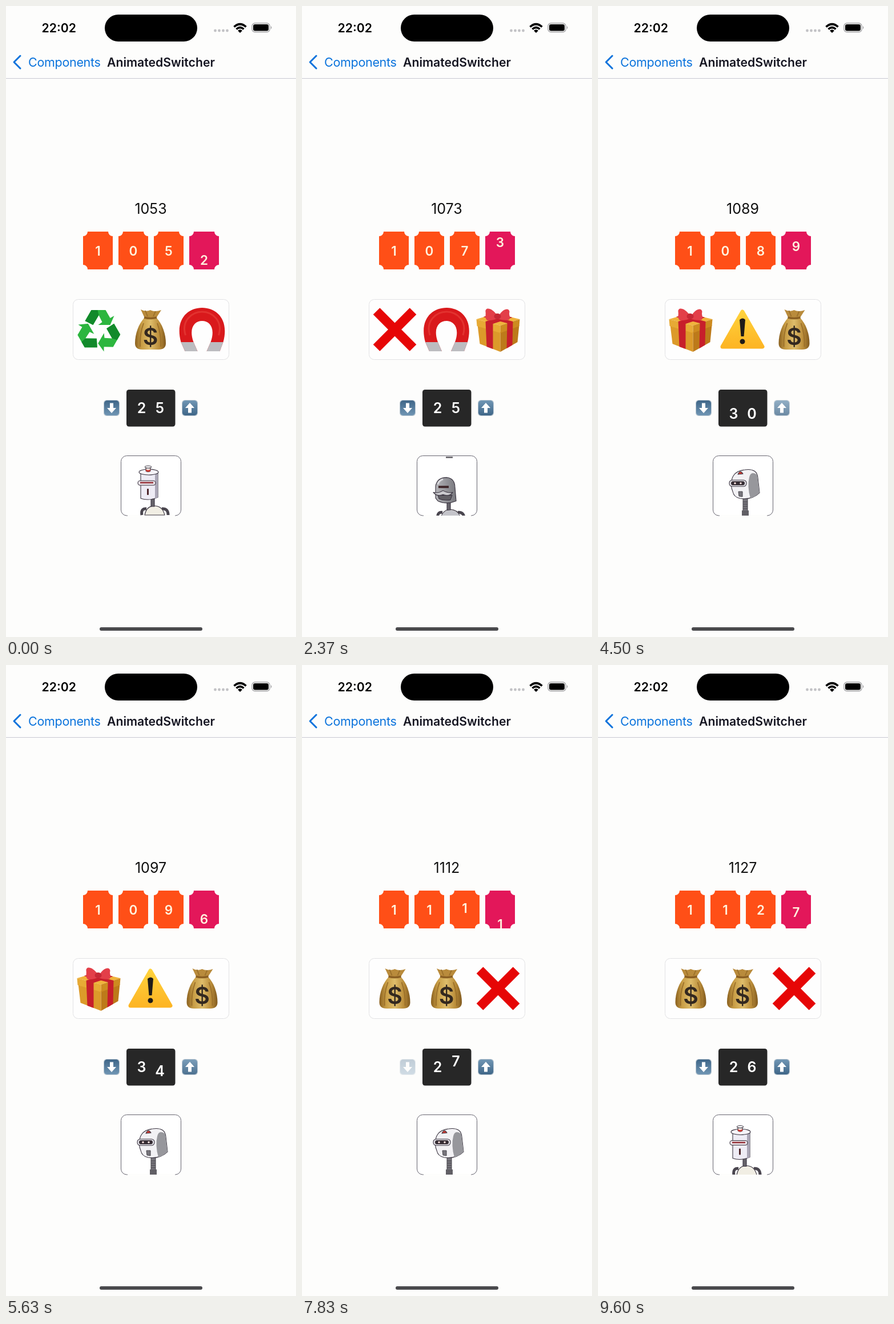
Write an HTML page that moves like this. It is 508 px wide and 1102 px high and loops after 9630 ms.

```html
<!DOCTYPE html>
<html lang="en">
<head>
<meta charset="utf-8">
<title>AnimatedSwitcher</title>
<style>
html, body { margin: 0; width: 100%; height: 100%; overflow: hidden; background: #fdfdfc; }
svg { display: block; width: 508px; height: 1102px; font-family: Inter, "Liberation Sans", sans-serif; }
.mid { text-anchor: middle; }
.semi { font-weight: 600; }
.ink { stroke: #3a3440; stroke-width: 1.1; stroke-linejoin: round; }
</style>
</head>
<body>
<svg viewBox="0 0 508 1102">
<defs>
  <linearGradient id="gold"><stop stop-color="#8a601f"/><stop offset=".22" stop-color="#c89d45"/><stop offset=".5" stop-color="#dfbd6b"/><stop offset=".8" stop-color="#b98b38"/><stop offset="1" stop-color="#80591e"/></linearGradient>
  <linearGradient id="amber" x2="0" y2="1"><stop stop-color="#ffd23c"/><stop offset="1" stop-color="#fdb524"/></linearGradient>
  <linearGradient id="steel" x2="0" y2="1"><stop stop-color="#7096b4"/><stop offset="1" stop-color="#3f6688"/></linearGradient>
  <linearGradient id="metal"><stop stop-color="#b4b4b8"/><stop offset="1" stop-color="#77777d"/></linearGradient>
  <clipPath id="reelClip"><rect x="118" y="513" width="272" height="104" rx="9"/></clipPath>
  <clipPath id="cardClip"><rect x="130" y="395" width="250" height="65"/></clipPath>
  <clipPath id="boxClip"><rect x="211" y="670" width="85" height="64"/></clipPath>
  <clipPath id="robotClip"><rect x="203" y="787" width="103" height="103" rx="9"/></clipPath>

  <path id="card" d="M8 0H44A8 8 0 0 0 52 8V58A8 8 0 0 0 44 66H8A8 8 0 0 0 0 58V8A8 8 0 0 0 8 0Z"/>
  <g id="key">
    <rect width="28" height="28" rx="5.5" fill="#b9c6d0"/>
    <rect x="1" y="1" width="26" height="26" rx="5" fill="url(#steel)"/>
    <path d="M14 5L22 14H17V22.5H11V14H6Z" fill="#fff"/>
  </g>

  <path id="cross" d="M-32-32L32 32M32-32L-32 32" stroke="#e60606" stroke-width="16.5"/>
  <g id="magnet">
    <path d="M-30 38L-37 22C-48-18-25-38 0-38S48-18 37 22L31 38H8L15 22C24-3 13-15 0-15S-24-3-15 22L-8 38Z" fill="#d9191c"/>
    <path d="M-29 10C-37-15-18-31 0-31S37-15 29 10" fill="none" stroke="#e2322f" stroke-width="3"/>
    <path d="M-37 22H-15L-8 38H-30ZM37 22H15L8 38H31Z" fill="#bcbcc0"/>
  </g>
  <g id="bag">
    <path d="M-17-35Q-8-30 0-34Q8-30 19-34L10-20H-10Z" fill="#b98b3c"/>
    <path d="M-10-21C-21-10-27 8-27 24Q-27 35-14 35H14Q27 35 27 24C27 8 21-10 10-21Z" fill="url(#gold)"/>
    <path d="M-11-21Q0-18 11-21" fill="none" stroke="#8c6023" stroke-width="3.5"/>
    <path d="M-9-33L-5-23M9-32L5-23M-12-11Q-19 8-18 30M12-11Q19 8 18 30" fill="none" stroke="#9a6f2a" stroke-width="1.8"/>
    <text class="mid semi" y="26.5" font-size="41" fill="#33281f">$</text>
  </g>
  <g id="gift">
    <path d="M-36-8L4 4V39L-32 25Z" fill="#dc9a2a"/>
    <path d="M4 4L37-8L34 22L4 39Z" fill="#bd7a1a"/>
    <path d="M-38-18L-4-28L38-18L4-7Z" fill="#f0b33c"/>
    <path d="M-38-18L4-7V6L-37-6Z" fill="#e7aa35"/>
    <path d="M4-7L38-18L37-6L4 6Z" fill="#cd8b20"/>
    <path d="M-22-14L12-25L25-21L-9-10L-9 34L-20 30ZM-26-22L-16-25L26-14L25 27L15 33L16-11Z" fill="#c71f2b"/>
    <path d="M-2-25C-10-38-23-40-22-31C-21-25-24-20-19-16C-11-15-5-18-1-19C5-17 14-15 19-17C23-21 18-25 20-31C19-39 8-36 2-25Z" fill="#e33f49"/>
    <ellipse cx="-1" cy="-23" rx="6" ry="5" fill="#c62835"/>
  </g>
  <g id="recycle">
    <g id="turn">
      <path d="M-24-15L-13-34H12L20-20L27-24L20-8H-1L6-13L0-25L-10-8Z" fill="#2cb63f"/>
      <path d="M-13-34H-2L0-25L-10-8L-24-15Z" fill="#128a2b"/>
    </g>
    <use href="#turn" transform="rotate(120 0 2)"/>
    <use href="#turn" transform="rotate(240 0 2)"/>
  </g>
  <g id="warning">
    <path d="M0-31L35 30H-35Z" fill="url(#amber)" stroke="url(#amber)" stroke-width="7" stroke-linejoin="round"/>
    <path d="M-5-17Q0-22 5-17L2.5 12H-2.5Z" fill="#1e1b18"/><circle cy="21" r="4.5" fill="#1e1b18"/>
  </g>
  <g id="cake">
    <path d="M-34-10Q0-42 34-10V28Q0 44-34 28Z" fill="#fbf0dc"/>
    <path d="M-18-29V-8M0-29V-8M18-29V-8" stroke="#d9c6dc" stroke-width="6"/>
    <path d="M-18-39l5 8-5 5-5-5ZM0-39l5 8-5 5-5-5ZM18-39l5 8-5 5-5-5Z" fill="#f7d670"/>
    <path d="M-34 8Q0 22 34 8V18Q0 32-34 18Z" fill="#d2434d"/>
  </g>

  <g id="torso">
    <path d="M238 892Q236 880 246 881M284 892Q284 880 273 881" fill="none" stroke="#4a464f" stroke-width="5"/>
    <path class="ink" d="M243 892Q246 876 260 876T278 892Z" fill="#f1eee4"/>
    <path class="ink" d="M254 862H260V877H254Z" fill="#66636a"/>
  </g>
  <g id="canister">
    <use href="#torso"/>
    <path class="ink" d="M236 817H266V861Q250 868 236 863Z" fill="#eeecf5"/>
    <path d="M261 822L266 818V861L261 864Z" fill="#aaa6b6"/>
    <ellipse class="ink" cx="250" cy="817" rx="17" ry="5" fill="#f5f3f8"/>
    <path class="ink" d="M245 808V815Q249 818 253 815V808Z" fill="#f4e9e5"/>
    <path d="M245 812Q249 815 253 812V815Q249 818 245 815Z" fill="#cf3932"/>
    <ellipse class="ink" cx="249" cy="808" rx="5.5" ry="2" fill="#fff"/>
    <rect class="ink" x="231" y="832" width="31" height="8" rx="4" fill="#ebe4ea"/>
    <path d="M235 835.5H258" stroke="#952f36" stroke-width="2.5"/>
    <rect x="247" y="846" width="3" height="11" rx="1" fill="#4d2529"/>
  </g>
  <g id="helmet">
    <path d="M254 858H262V882H254Z" fill="#77757c" stroke="#47454b"/>
    <path d="M254 866H262M254 870H262M254 874H262M254 878H262" stroke="#47454b"/>
    <path d="M252 881H264V890H252Z" fill="#615f65"/>
    <path class="ink" d="M234 842Q230 813 257 810Q279 807 280 824L283 850Q270 863 249 860Q238 858 236 848Z" fill="#f2f1f4"/>
    <path d="M265 823Q268 811 279 819L283 850Q276 857 267 860Q261 839 265 823Z" fill="#97979c"/>
    <path class="ink" d="M245 818Q249 809 254 817Z" fill="#d33b32"/>
    <rect class="ink" x="230" y="828" width="30" height="11" rx="5" fill="#e4e2e8"/>
    <rect x="233" y="830" width="24" height="7" rx="3.5" fill="#362d34"/>
    <circle cx="240" cy="833.5" r="1.7" fill="#f4dcda"/><circle cx="250" cy="833.5" r="1.7" fill="#f4dcda"/>
    <path d="M246 848H253V857L247 856Z" fill="#77757c" stroke="#47454b"/>
  </g>
  <g id="dome">
    <use href="#torso"/>
    <path d="M244 890Q247 877 260 877T277 890Z" fill="#c4c4ca"/>
    <path class="ink" d="M234 856V835Q237 820 253 820Q268 821 268 838L270 861Q253 868 238 861Z" fill="url(#metal)"/>
    <path d="M238 832Q240 825 247 823" fill="none" stroke="#d9d9dd" stroke-width="3"/>
    <rect x="239" y="834.5" width="18" height="4" fill="#40282b"/>
    <path class="ink" d="M238 851H263L260 859Q248 861 240 857Z" fill="#615f65"/>
    <path class="ink" d="M230 846Q239 848 247 843Q256 848 264 846Q259 854 247 850Q236 854 230 846Z" fill="#cacace"/>
  </g>
</defs>

<rect width="508" height="1102" fill="#fdfdfc"/>
<text class="semi" x="62.5" y="46" font-size="21.2">22:02</text>
<rect x="173" y="15" width="162" height="47" rx="23.5"/>
<g fill="#c3c3c6"><circle cx="366.5" cy="43" r="2.4"/><circle cx="373.5" cy="43" r="2.4"/><circle cx="380.5" cy="43" r="2.4"/><circle cx="387.5" cy="43" r="2.4"/></g>
<g fill="none" stroke="#000" stroke-width="3.6"><path d="M399.5 36.5Q410 27 420.5 36.5M403.5 40.5Q410 34.5 416.5 40.5"/></g>
<path d="M406 43Q410 39.5 414 43L410 47Z"/>
<rect x="431" y="30" width="31" height="15.5" rx="5" fill="none" stroke="#a2a2a5" stroke-width="1.4"/>
<rect x="433" y="32" width="27" height="11.5" rx="3.2"/>
<path d="M464 35Q467 37.7 464 40.5Z" fill="#a2a2a5"/>
<path d="M25 87L14 98L25 109" fill="none" stroke="#0a73dc" stroke-width="3" stroke-linecap="round" stroke-linejoin="round"/>
<text x="39" y="105.5" font-size="21.5" letter-spacing="-.3" fill="#0a73dc">Components</text>
<text class="semi" x="177" y="105.5" font-size="21.2" fill="#151521">AnimatedSwitcher</text>
<path d="M0 126.5H508" stroke="#c9c9d2"/>
<text id="total" class="mid" x="253.5" y="363" font-size="25" fill="#111"></text>
<g fill="#ff4f17"><use href="#card" x="135" y="394"/><use href="#card" x="197" y="394"/><use href="#card" x="259" y="394"/><use href="#card" x="321" y="394" fill="#e3175a"/></g>
<g id="cards" class="mid semi" clip-path="url(#cardClip)" font-size="22.5" fill="#fff3de"></g>
<rect x="117.5" y="512.5" width="273" height="105" rx="9" fill="#fefefe" stroke="#e2e2e4"/>
<g id="reels" clip-path="url(#reelClip)"></g>
<g id="down"><use href="#key" transform="translate(171 716) scale(1 -1)"/></g>
<g id="up"><use href="#key" x="308" y="688"/></g>
<rect x="211" y="670" width="85.5" height="64.5" rx="4.5" fill="#272727"/>
<g id="digits" class="mid semi" clip-path="url(#boxClip)" font-size="25" fill="#fff"></g>
<rect x="201.5" y="785.5" width="105" height="104.5" rx="10" fill="#fff" stroke="#66646f"/>
<path d="M213 890H296" stroke="#fdfdfc" stroke-width="2.4"/>
<g id="robots" clip-path="url(#robotClip)"></g>
<rect x="164" y="1085" width="180" height="6" rx="3" fill="#4a4a4d"/>
</svg>

<script>
const LOOP = 9630;
const layer = id => document.getElementById(id);
const clamp = x => Math.max(0, Math.min(1, x));
const label = (text, x, y) => `<text x="${x}" y="${y.toFixed(2)}">${text}</text>`;
const icon = (name, x, y) => `<use href="#${name}" x="${x}" y="${y.toFixed(2)}"/>`;

// [time, counter value]
const pace = [[0, 1053.15], [900, 1060.95], [2370, 1073.68], [4500, 1089.79],
  [6830, 1104.98], [7830, 1112.28], [9600, 1127.98], [9630, 1128.2]];

function counterAt(t) {
  const i = pace.findIndex(p => p[0] > t);
  const [[t0, a], [t1, b]] = [pace[i - 1], pace[i]];
  return a + (b - a) * (t - t0) / (t1 - t0);
}

function drawCounter(t) {
  const count = counterAt(t), whole = Math.floor(count);
  layer('total').textContent = whole;
  let out = '';
  for (let place = 0; place < 4; place++) {
    const unit = 10 ** place, group = Math.floor(whole / unit);
    const x = 347 - place * 62, phase = count - whole;
    const age = (count - group * unit) * 120;
    let leaving, shift;
    if (place === 0) {
      leaving = phase < .4;
      shift = leaving ? 6 + 27 * phase / .4 : -33 + 39 * (phase - .4) / .6;
    } else {
      leaving = age < 50;
      const s = age - 50;
      shift = leaving ? 33 * age / 50 : -33 * Math.exp(-s / 90) * Math.cos(2 * Math.PI * s / 240);
    }
    out += label((group - leaving) % 10, x, 435.7 + shift);
  }
  layer('cards').innerHTML = out;
}

const kinds = ['recycle', 'bag', 'magnet', 'cross', 'gift', 'cake', 'warning'];
const rests = [['recycle', 'bag', 'magnet'], ['cross', 'magnet', 'gift'],
  ['gift', 'warning', 'bag'], ['bag', 'bag', 'cross']];
const spinStarts = [300, 3600, 6900];
const spinTimes = [845, 690, 777], seeds = [3, 5, 0];
const STEPS = 6, PITCH = 106;

function drawReels(t) {
  const spin = Math.max(0, spinStarts.filter(s => s <= t).length - 1);
  let out = '';
  for (let col = 0; col < 3; col++) {
    const u = clamp((t - spinStarts[spin]) / spinTimes[col]);
    const pos = STEPS * (1 - (1 - u) ** 2);
    for (let k = Math.floor(pos); k <= Math.min(STEPS, Math.ceil(pos)); k++) {
      const name = k === 0 ? rests[spin][col] : k === STEPS ? rests[spin + 1][col]
        : kinds[(k + seeds[col]) % kinds.length];
      out += icon(name, 162.5 + col * 90.5, 565 + (pos - k) * PITCH);
    }
  }
  layer('reels').innerHTML = out;
}

const taps = [];
for (let v = 26; v <= 34; v++) taps.push({ at: 4355 + (v - 30) * 280, from: v - 1, to: v });
for (let v = 33; v >= 26; v--) taps.push({ at: 6706 + (30 - v) * 273.5, from: v + 1, to: v });

function drawStepper(t) {
  const tap = taps.filter(p => p.at <= t).pop() || { at: -1e4, from: 25, to: 25 };
  const age = t - tap.at;
  const leaving = age < 100;
  const shift = leaving ? -33 * age / 100 : 33 * (1 - clamp((age - 100) / 100)) ** 2;
  const old = String(tap.from), next = String(tap.to);
  layer('digits').innerHTML = [0, 1].map(i => {
    const moving = old[i] !== next[i];
    return label((leaving ? old : next)[i], 237.5 + i * 32, 711 + (moving ? shift : 0));
  }).join('');
  const fade = age < 110 ? 1 - .8 * clamp(age / 35) : .2 + .8 * clamp((age - 110) / 50);
  const pressed = tap.to > tap.from ? 'up' : 'down';
  for (const id of ['up', 'down']) layer(id).setAttribute('opacity', id === pressed ? fade : 1);
}

const cast = ['canister', 'helmet', 'dome'];
const swaps = [-450, 1350, 2187, 2650, 3100, 8450, 9100];

function drawRobots(t) {
  const turn = swaps.filter(s => s <= t).length - 1;
  const age = t - swaps[turn];
  const shift = 104 * Math.exp(-age / 130) * Math.cos(Math.PI * age / 400);
  const leaving = shift > 1 ? icon(cast[(turn + 2) % 3], 0, shift - 104) : '';
  layer('robots').innerHTML = leaving + icon(cast[turn % 3], 0, shift);
}

function render(t) {
  drawCounter(t);
  drawReels(t);
  drawStepper(t);
  drawRobots(t);
}

let start = null;
function tick(now) {
  start ??= now;
  render(Math.max(0, now - start) % LOOP);
  requestAnimationFrame(tick);
}
render(0);
requestAnimationFrame(tick);
</script>
</body>
</html>
```
